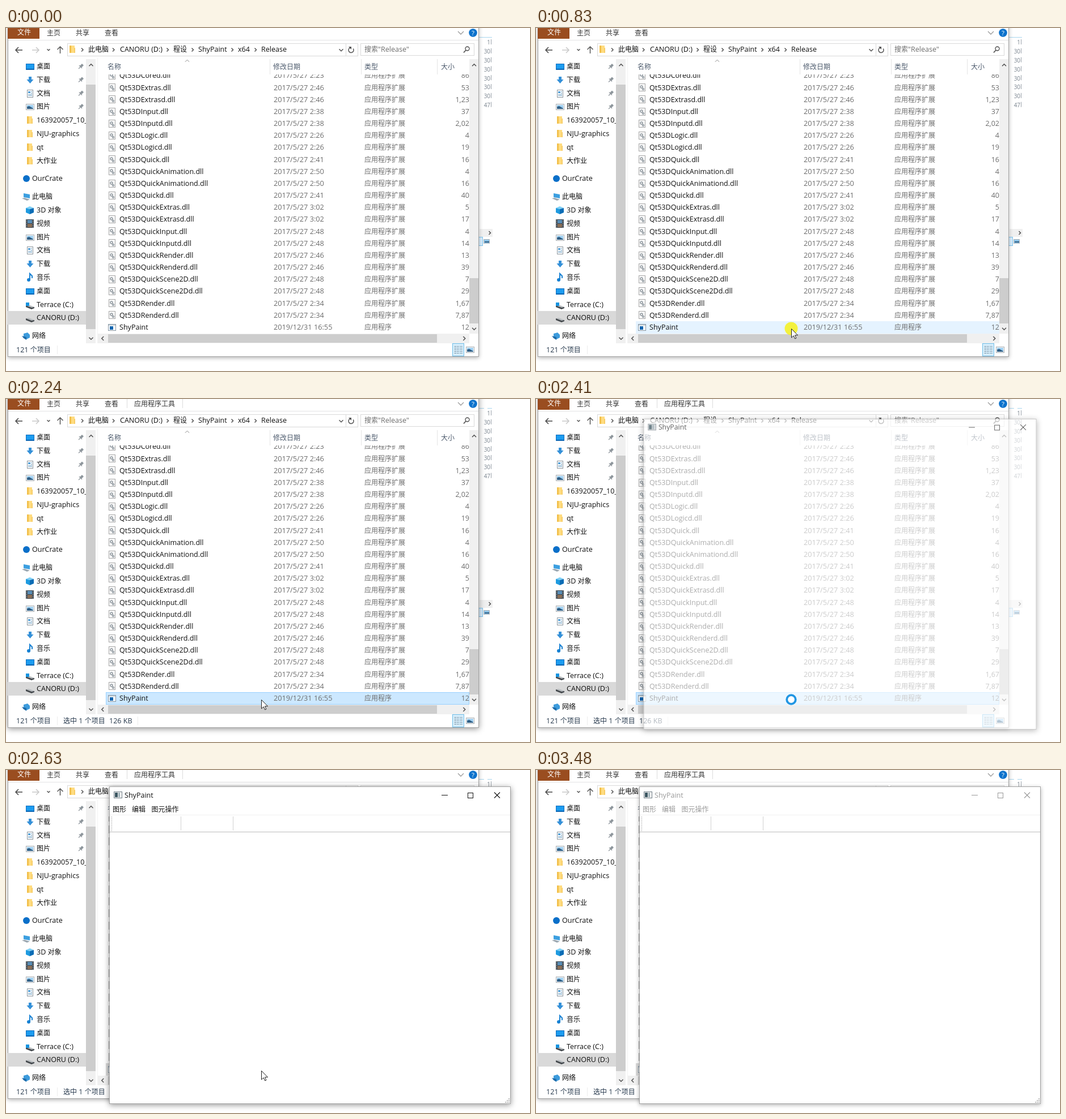
Write an HTML page with a canvas that moves like this. It is 924x606 px and loops after 3.63 s.

```html
<!DOCTYPE html>
<html lang="zh">
<head>
<meta charset="utf-8">
<style>
html, body { margin: 0; width: 100%; height: 100%; overflow: hidden; background: #fff; }
canvas { display: block; width: 924px; height: 606px; }
</style>
</head>
<body>
<canvas id="stage" width="924" height="606"></canvas>
<script>
const ctx = document.getElementById('stage').getContext('2d');
const LOOP = 3630;
const TICKS = [0, 130, 210, 290, 370, 440, 520, 600, 680, 760, 830, 910, 990, 1070, 1150,
  2240, 2330, 2410, 2480, 2550, 2630, 2780, 2860, 2930, 3010, 3480];

const FILES = `Cored 2:23 86|Extras 2:46 53|Extrasd 2:46 1,23|Input 2:38 37|Inputd 2:38 2,02|Logic 2:26 4
Logicd 2:26 19|Quick 2:41 16|QuickAnimation 2:50 4|QuickAnimationd 2:50 16|Quickd 2:41 40|QuickExtras 3:02 5
QuickExtrasd 3:02 17|QuickInput 2:48 4|QuickInputd 2:48 14|QuickRender 2:46 13|QuickRenderd 2:46 39
QuickScene2D 2:48 7|QuickScene2Dd 2:48 29|Render 2:34 1,67|Renderd 2:34 7,87`
  .split(/[|\n]/).map(row => row.split(' '));

const SIDEBAR = [
  ['桌面', 68, 'desktop'], ['下载', 91.5, 'download'], ['文档', 115.5, 'doc'], ['图片', 139, 'picture'],
  ['163920057_10_2', 163, 'folder'], ['NJU-graphics', 187, 'folder'], ['qt', 211, 'folder'], ['大作业', 234.5, 'folder'],
  ['OurCrate', 266, 'dot', 1], ['此电脑', 298, 'pc', 1],
  ['3D 对象', 322, 'cube'], ['视频', 345.5, 'film'], ['图片', 369.5, 'picture'], ['文档', 393, 'doc'],
  ['下载', 417, 'download'], ['音乐', 441, 'music'], ['桌面', 465, 'desktop'],
  ['Terrace (C:)', 488.5, 'system'], ['CANORU (D:)', 512, 'drive'], ['网络', 544, 'network', 1]
];

function rect(x, y, w, h, fill, border) {
  if (border) {
    ctx.fillStyle = border;
    ctx.fillRect(x, y, w, h);
    x++; y++; w -= 2; h -= 2;
  }
  ctx.fillStyle = fill;
  ctx.fillRect(x, y, w, h);
}

function trace(pts) {
  ctx.beginPath();
  for (let i = 0; i < pts.length; i += 2) ctx.lineTo(pts[i], pts[i + 1]);
}

function line(color, width, ...pts) {
  trace(pts);
  ctx.strokeStyle = color;
  ctx.lineWidth = width;
  ctx.stroke();
}

function poly(color, ...pts) {
  trace(pts);
  ctx.closePath();
  ctx.fillStyle = color;
  ctx.fill();
}

function circle(x, y, r, color, ring) {
  ctx.beginPath();
  ctx.arc(x, y, r, 0, 7);
  ctx.fillStyle = ctx.strokeStyle = color;
  ctx.lineWidth = ring;
  ring ? ctx.stroke() : ctx.fill();
}

function clipped(x, y, w, h, draw) {
  ctx.save();
  ctx.beginPath();
  ctx.rect(x, y, w, h);
  ctx.clip();
  draw();
  ctx.restore();
}

// y is the middle of the line; Chinese and Latin runs use their own faces.
function text(s, x, y, color = '#111', size = 12, right = false) {
  ctx.fillStyle = color;
  for (const run of s.match(/[\u3000-\u9fff]+|[^\u3000-\u9fff]+/g)) {
    ctx.font = run > '\u3000' ? `${size}px "Noto Sans CJK SC", "Noto Sans CJK", sans-serif`
      : `${size * 1.045}px "Open Sans", sans-serif`;
    const w = ctx.measureText(run).width;
    ctx.fillText(run, right ? x - w : x, y + 4.4);
    x += w;
  }
}

// Chevron with its tip turned by quarter turns from "right".
function chevron(x, y, turn, color = '#505050', r = 3.5, width = 1.5) {
  ctx.save();
  ctx.translate(x, y);
  ctx.rotate(turn * Math.PI / 2);
  line(color, width, -r / 2, -r, r / 2, 0, -r / 2, r);
  ctx.restore();
}

const ICONS = {
  desktop() {
    rect(-7, -5, 15, 11, '#1c9cf0', '#0b6cbd');
    rect(-6, 4, 13, 1, '#0b5ea8');
  },
  download() {
    rect(-2, -6, 5, 6, '#3490d8');
    poly('#3490d8', -5.5, -1, 6.5, -1, .5, 6);
  },
  doc() {
    rect(-5, -7, 11, 14, '#fff', '#8d979f');
    rect(-3, -4, 4, 3, '#4d9bd4');
    for (const y of [-4, -1, 1, 3]) rect(y < 0 ? 2 : -3, y, y < 0 ? 2 : 7, 1, '#7aa9ca');
  },
  picture() {
    rect(-7, -5, 15, 11, '#fff', '#a5abb0');
    rect(-5, -3, 11, 7, '#9fd0f2');
    poly('#2f5f86', -5, 4, -5, 0, -1, -1, 6, 3, 6, 4);
  },
  folder() {
    rect(-5, -7, 9, 13, '#ffdc80');
    rect(-5, -7, 3, 13, '#f2c04d');
    rect(3, -3, 2, 9, '#f7cd69');
  },
  dot() { circle(0, 0, 6, '#0a6fc9'); },
  pc() {
    poly('#3c9fe0', -5, -6, 6, -4, 6, 3, -5, 1);
    poly('#9aa7b1', -8, 3, -3, 2, 6, 5, 1, 7);
  },
  cube() {
    poly('#7fd0f5', -7, -4, 0, -7, 7, -4, 0, -2);
    poly('#1e9be0', -7, -4, 0, -2, 0, 7, -7, 4);
    poly('#0b6cb5', 7, -4, 0, -2, 0, 7, 7, 4);
  },
  film() {
    rect(-7, -8, 14, 15, '#39434c');
    rect(-4, -7, 8, 6, '#5a8fb8');
    rect(-4, 0, 8, 6, '#8b6f58');
    for (let y = -7; y < 7; y += 3) { rect(-6, y, 1, 1, '#fff'); rect(5, y, 1, 1, '#fff'); }
  },
  music() {
    circle(-2, 4, 3, '#1681d3');
    line('#1681d3', 2, 0, 4, 0, -7, 4, -3, 4, 1);
  },
  drive() {
    poly('#b9bdc0', -7, 1, -2, 0, 8, 4, 3, 6);
    poly('#44494d', -7, 1, 3, 5, 8, 4, 8, 6, 3, 8, -7, 4);
  },
  system() {
    ICONS.drive();
    rect(-7, -4, 6, 6, '#1593e0');
  },
  network() {
    poly('#3d9bdc', -5, -4, 2, -6, 6, -2, 6, 3, 0, 6, -5, 2);
    poly('#1c6aa8', -8, 0, 0, 2, 0, 7, -5, 4);
  },
  dll() {
    rect(-6, -7, 12, 14, '#fafafa', '#a6a6a6');
    circle(-1, -1, 2, '#8c959c', 1.5);
    circle(2, 3, 1.5, '#8c959c', 1.3);
  },
  exe() {
    rect(-7, -6, 14, 12, '#fff', '#8696a3');
    rect(-6, -5, 12, 2, '#c9d3da');
    rect(-4, -2, 6, 6, '#1366b0');
  }
};

function icon(name, x, y) {
  ctx.save();
  ctx.translate(x, Math.round(y));
  ICONS[name]();
  ctx.restore();
}

// The shadow stays outside the window, so a fading window tints nothing below it.
function panel(x, y, w, h, active) {
  ctx.save();
  ctx.beginPath();
  ctx.rect(-50, -50, 1024, 706);
  ctx.rect(x, y, w, h);
  ctx.clip('evenodd');
  ctx.shadowColor = `rgba(0,0,0,${active ? .42 : .3})`;
  ctx.shadowBlur = active ? 10 : 7;
  ctx.shadowOffsetY = 2;
  rect(x, y, w, h, '#fff');
  ctx.restore();
  rect(x, y, w, h, '#fff');
  ctx.strokeStyle = 'rgba(0,0,0,.36)';
  ctx.lineWidth = 1;
  ctx.strokeRect(x + .5, y + .5, w - 1, h - 1);
}

function backWindow(t) {
  rect(834, 16, 23, 1, '#a9d6ee');
  if (t >= 910) rect(843, 16, 6, 1, '#fff');
  ['1', '30', '30', '30', '30', '30', '30', '47'].forEach((n, i) => {
    const y = 25 + i * 15.8;
    text(n, 854, y, '#77818c', 9.5, true);
    rect(855, y - 5, 1, 9, '#9aa2aa');
  });
  rect(835, 355, 23, 14, '#f0f0f0');
  chevron(853, 362, 0, '#505050', 3);
  rect(833, 369, 8, 16, '#d9efff', '#7fc4ec');
  rect(842, 373, 11, 8, '#8fc4e8', '#b5b9bd');
  rect(844, 377, 8, 2, '#2f5f86');
}

function ribbon(selected) {
  rect(3, 0, 56, 19, '#9a4d20');
  text('文件', 20, 8, '#fff');
  text('主页', 72, 9, '#333');
  text('共享', 123, 9, '#333');
  text('查看', 174, 9, '#333');
  if (selected) {
    rect(213, 0, 1, 16, '#dcdcdc');
    rect(311, 0, 1, 16, '#dcdcdc');
    text('应用程序工具', 226, 9, '#333');
  }
  rect(4, 21, 829, 1, '#e2e3e4');
  chevron(802, 8.5, 1, '#9a9a9a', 5, 1.3);
  circle(823.5, 8.5, 7.3, '#0b72cc');
  text('?', 821, 8.5, '#fff', 11);
}

function addressBar() {
  line('#444', 1.5, 29, 39, 17, 39);
  line('#444', 1.5, 22, 34, 17, 39, 22, 44);
  line('#c8c8c8', 1.5, 46, 39, 58, 39);
  line('#c8c8c8', 1.5, 53, 34, 58, 39, 53, 44);
  chevron(75, 38.5, 1, '#555', 2.5);
  line('#555', 1.5, 95.5, 45, 95.5, 33);
  line('#555', 1.5, 90.5, 38, 95.5, 33, 100.5, 38);
  rect(108, 27, 513, 23, '#fff', '#d9d9d9');
  rect(599, 28, 1, 21, '#d9d9d9');
  icon('folder', 117, 38);
  for (const x of [134.5, 189.5, 285, 329, 399, 440]) chevron(x, 38.5, 0, '#555', 3);
  [['此电脑', 145], ['CANORU (D:)', 201], ['程设', 295], ['ShyPaint', 339], ['x64', 409], ['Release', 450]]
    .forEach(([s, x]) => text(s, x, 38));
  chevron(591, 39, 1, '#555', 3.5);
  ctx.beginPath();
  ctx.arc(608.5, 39, 4.5, -.6, 4.4);
  ctx.strokeStyle = '#555';
  ctx.lineWidth = 1.5;
  ctx.stroke();
  poly('#555', 604, 33, 609, 33, 609, 38);
  rect(625, 27, 201, 22, '#fff', '#d9d9d9');
  text('搜索"Release"', 632, 38, '#6d6d6d');
  circle(813.5, 36.5, 3.5, '#555', 1.4);
  line('#555', 1.8, 811, 39, 807, 43.5);
}

function sidebar() {
  rect(3, 500, 138, 24, '#d9d9d9');
  clipped(3, 50, 138, 507, () => {
    SIDEBAR.forEach(([label, y, name, top], i) => {
      icon(name, top ? 36 : 42, y);
      text(label, top ? 46 : 54, y);
      if (i < 4) {
        poly('#8f979d', 130, y - 1, 134, y - 5, 137, y - 2, 133, y + 2);
        line('#8f979d', 1.2, 129, y - 2, 134, y + 3);
        line('#8f979d', 1.2, 131.5, y + .5, 128, y + 4);
      }
    });
  });
  rect(141, 55, 17, 502, '#f0f0f0');
  rect(141, 100, 17, 432, '#cdcdcd');
  chevron(150, 65.5, -1);
  chevron(150, 548.5, 1);
  rect(161, 52, 1, 505, '#f3f3f3');
}

function fileList(rowFill, rowBorder) {
  text('名称', 179, 69, '#4c5a6c');
  text('修改日期', 471, 69, '#4c5a6c');
  text('类型', 632, 69, '#4c5a6c');
  text('大小', 767, 69, '#4c5a6c');
  for (const x of [465, 626, 760]) rect(x, 55, 1, 27, '#e5e5e5');
  chevron(319.5, 58, -1, '#888', 3.5, 1);
  if (rowFill) rect(176, 518, 641, 22, rowFill, rowBorder);
  clipped(162, 82, 655, 458, () => {
    const row = (i, name, date, type, size, kind) => {
      const y = 84 + i * 21.17;
      icon(kind, 187, y);
      text(name, 200, y);
      text(date, 472, y, '#6d6d6d', 12.2);
      text(type, 632, y, '#6d6d6d');
      text(size, 817, y, '#6d6d6d', 12, true);
    };
    FILES.forEach(([name, time, size], i) => row(i, `Qt53D${name}.dll`, `2017/5/27 ${time}`, '应用程序扩展', size, 'dll'));
    row(21, 'ShyPaint', '2019/12/31 16:55', '应用程序', '12', 'exe');
  });
  rect(817, 55, 16, 485, '#f0f0f0');
  rect(817, 442, 16, 80, '#cdcdcd');
  chevron(825.5, 65.5, -1);
  chevron(825.5, 531.5, 1);
  rect(162, 540, 655, 17, '#f0f0f0');
  rect(180, 541, 580, 15, '#cdcdcd');
  chevron(170.5, 548.5, 2);
  chevron(808, 548.5, 0);
}

function statusBar(selected) {
  text('121 个项目', 18, 568.5, '#26384c');
  rect(90, 561, 1, 15, '#ececec');
  if (selected) {
    text('选中 1 个项目', 101, 568.5, '#26384c');
    text('126 KB', 182, 568.5, '#26384c');
    rect(232, 561, 1, 15, '#ececec');
  }
  rect(787, 557, 21, 23, '#d5edfb', '#6fbde8');
  for (let y = 562; y < 576; y += 3) {
    rect(791, y, 2, 1, '#567');
    rect(794, y, 5, 1, '#8aa0b0');
    rect(800, y, 5, 1, '#8aa0b0');
  }
  icon('picture', 818, 568);
}

function explorer(t, hover) {
  const selected = t >= 910, active = selected && t < 2330;
  panel(3, -10, 831, 591, active);
  ribbon(t >= 990);
  addressBar();
  sidebar();
  if (t >= 2550) fileList('#d9d9d9');
  else if (selected) fileList('#cce8ff', '#99d1ff');
  else fileList(hover && '#e5f3ff');
  statusBar(selected);
}

function paintApp(t) {
  if (t < 2330) return;
  const rest = (1 - Math.min(1, (t - 2330) / 220)) ** 2;
  const scale = 1 - .052 * rest;
  const active = t < 3480, ink = active ? '#111' : '#999';
  ctx.save();
  ctx.globalAlpha = 1 - .86 * rest;
  ctx.translate(536, 310);
  ctx.scale(scale, scale);
  ctx.translate(-536, -310);
  panel(182, 29, 708, 561, active);
  rect(190, 38, 15, 12, '#f4f4f4', '#6f7c85');
  rect(192, 40, 5, 8, '#3a5560');
  rect(198, 40, 3, 8, '#9fb0b8');
  text('ShyPaint', 209, 44.5, ink);
  rect(768, 44, 11, 1, ink);
  ctx.strokeStyle = ink;
  ctx.lineWidth = 1;
  ctx.strokeRect(814.5, 40.5, 9, 9);
  line(ink, 1.1, 861, 39.5, 871, 49.5);
  line(ink, 1.1, 871, 39.5, 861, 49.5);
  if (t >= 2550) {
    text('图形', 188, 70, ink);
    text('编辑', 222, 70, ink);
    text('图元操作', 256.5, 70, ink);
    rect(183, 79, 706, 1, '#f0f0f0');
    for (let y = 82; y < 108; y += 3) rect(186, y, 1, 2, '#bbb');
    rect(308, 82, 1, 25, '#d2d2d2');
    rect(400, 82, 1, 25, '#d2d2d2');
    rect(183, 109, 706, 1, '#bdbdbd');
    for (let i = 0; i < 3; i++)
      for (let j = 2 - i; j < 3; j++) rect(880 + i * 3, 580 + j * 3, 2, 2, '#bbb');
  }
  ctx.restore();
}

function cursorAt(t) {
  if (t < 130 || t >= 3010) return null;
  const mix = (x0, y0, x1, y1, p) => ({ x: x0 + (x1 - x0) * p, y: y0 + (y1 - y0) * p });
  if (t < 600) return mix(472, 584, 450, 531, Math.sin((t - 130) / 470 * Math.PI / 2));
  if (t < 2780) return { x: 450, y: 531 };
  return mix(450, 531, 796, 590, (t - 2700) / 230);
}

function busyRing(x, y, r, width) {
  circle(x, y, r + width / 2, '#fff');
  circle(x, y, r, '#2196e3', width);
}

function drawCursor({ x, y }, t) {
  if (t >= 2330 && t < 2630) return busyRing(x, y, 7.8, 3.8);
  if ((t >= 680 && t < 760) || (t >= 830 && t < 990)) circle(x, y, 11.5, 'rgba(245,240,20,.82)');
  ctx.save();
  ctx.translate(x + .5, y + .5);
  poly('#fff', 0, 0, 0, 15.5, 3.6, 12.2, 6.2, 17.5, 8.4, 16.5, 6, 11.3, 11, 11.3);
  ctx.strokeStyle = '#222';
  ctx.lineWidth = 1;
  ctx.stroke();
  ctx.restore();
  if (t >= 1150 && t < 2240) busyRing(x + 14.5, y, 5.7, 3);
}

function draw(now) {
  const t = TICKS.findLast(tick => tick <= now % LOOP);
  const cursor = cursorAt(t);
  rect(0, 0, 924, 606, '#fff');
  backWindow(t);
  explorer(t, cursor && cursor.y < 540);
  paintApp(t);
  if (cursor) drawCursor(cursor, t);
}

let start;
function frame(now) {
  start ??= now;
  draw(now - start);
  requestAnimationFrame(frame);
}
requestAnimationFrame(frame);
</script>
</body>
</html>
```
